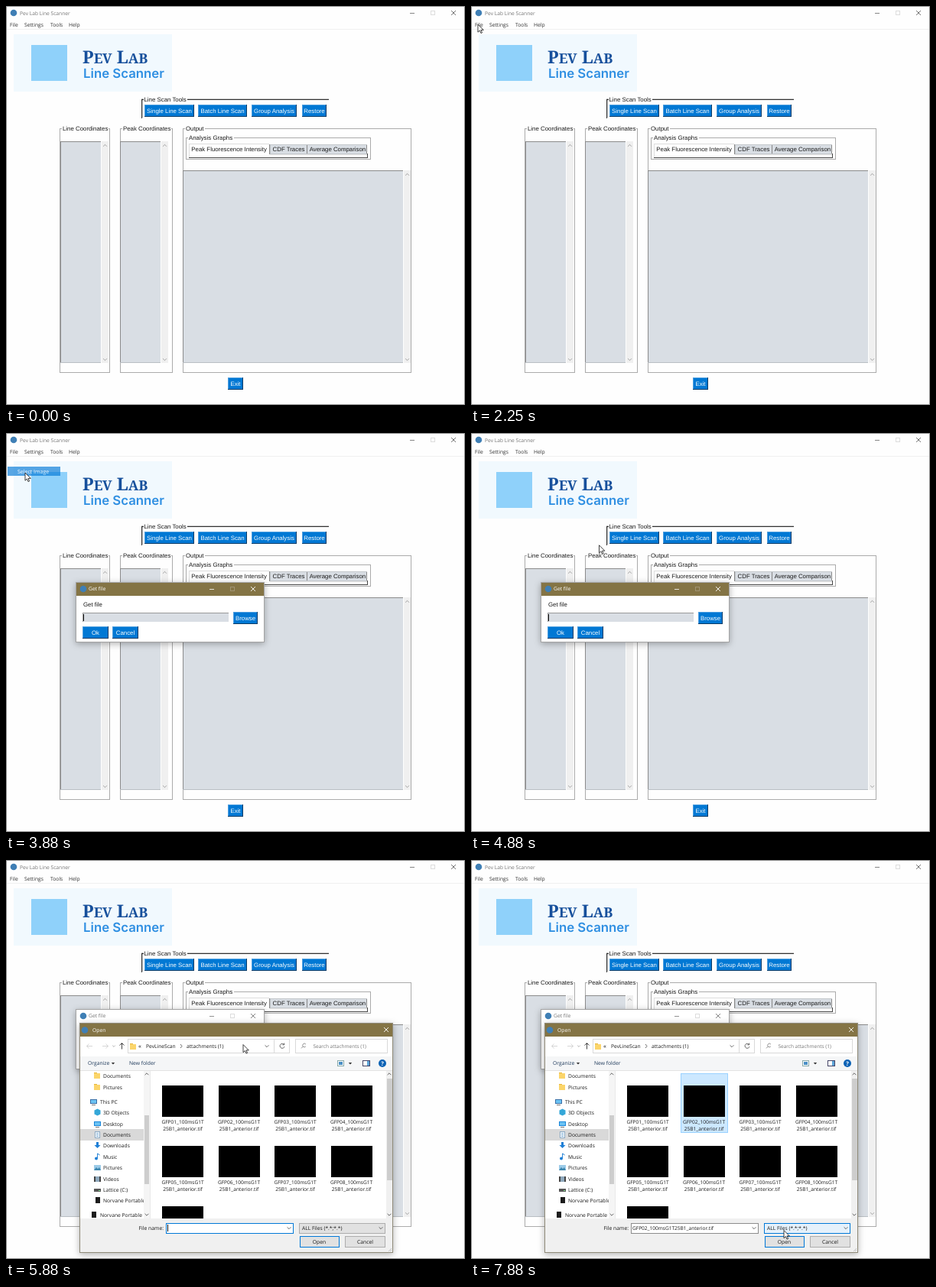
Animation, 600 px wide and 522 px high, one loop 8 s. Source, as an HTML page:

```html
<!DOCTYPE html>
<html lang="en">
<head>
<meta charset="utf-8">
<title>Pev Lab Line Scanner</title>
<style>
html, body { margin: 0; width: 100%; height: 100%; overflow: hidden; background: #fff; }
svg { display: block; width: 600px; height: 522px; }
text { text-rendering: geometricPrecision; white-space: pre; }
rect { shape-rendering: crispEdges; }
.ui { font-family: "Open Sans", "Noto Sans", sans-serif; }
.tk { font-family: "Liberation Sans", Arial, sans-serif; }
.logo { font-family: "Noto Serif", serif; font-weight: 600; }
.brand { font-family: Inter, sans-serif; font-weight: 600; }
</style>
</head>
<body>
<svg id="stage" viewBox="0 0 600 522" xmlns="http://www.w3.org/2000/svg"></svg>
<script>
const BLUE = '#0178d4', PANEL = '#d9dee4', BROWN = '#847445', SKY = '#8fd1fa';
const LOOP = 8000, STEP = 125;

// ---- drawing helpers, each returns SVG markup ----
const box = (x, y, w, h, fill, extra = '') =>
  `<rect x="${x}" y="${y}" width="${w}" height="${h}" fill="${fill}" ${extra}/>`;
const edge = (x, y, w, h, stroke, fill = 'none', extra = '') =>
  box(x + .5, y + .5, w - 1, h - 1, fill, `stroke="${stroke}" ${extra}`);
const line = (d, stroke = '#555', w = .8, extra = '') =>
  `<path d="${d}" fill="none" stroke="${stroke}" stroke-width="${w}" ${extra}/>`;
const shape = (d, fill) => `<path d="${d}" fill="${fill}"/>`;
const dot = (x, y, r, fill) => `<circle cx="${x}" cy="${y}" r="${r}" fill="${fill}"/>`;
const text = (cls, x, y, s, size, fill = '#1a1a1a', anchor = 'start', extra = '') =>
  `<text class="${cls}" x="${x}" y="${y}" font-size="${size}" fill="${fill}" text-anchor="${anchor}" ${extra}>${s}</text>`;
const ui = (x, y, s, size = 6.75, fill, anchor, extra) => text('ui', x, y, s, size, fill, anchor, extra);
const tk = (x, y, s, fill, anchor) => text('tk', x, y, s, 7.85, fill, anchor);
const group = (id, s, extra = '') => `<g id="${id}" ${extra}>${s}</g>`;

const chevron = (x, y, up, c = '#555', r = 2.4) => {
  const d = up ? -r / 2 : r / 2;
  return line(`M${x - r} ${y - d}L${x} ${y + d}L${x + r} ${y - d}`, c, .9);
};
const caretDown = (x, y) => shape(`M${x - 2.2} ${y - 1}h4.4l-2.2 2.6z`, '#333');
const cross = (x, y, c) => line(`M${x - 3} ${y - 3}l6 6m0 -6l-6 6`, c, .9);
const winButtons = (x, y, c, dim) =>
  line(`M${x} ${y + .5}h6`, c) + edge(x + 27, y - 3, 6, 6, dim) + cross(x + 57, y, c);

function button(x, y, w, label) {
  const h = 16;
  return box(x, y, w, h, '#0b3b66') + box(x, y, w - 1, h - 1, '#4f9fdf') +
    box(x + 1, y + 1, w - 2, h - 2, BLUE) +
    tk(x + w / 2, y + 10.7, label, '#fff', 'middle');
}
function frame(x, y, w, h, label, lw) {
  return edge(x, y, w, h, '#ababab') + box(x + 3, y - 3, lw + 2, 7, '#fefefe') +
    tk(x + 4, y + 3, label);
}
function listBox(x, y, w, h) {
  const s = x + w + 1, c = s + 4.5;
  return box(x, y, w, h, PANEL) + box(x, y, w, 1, '#8b8b8b') + box(x, y, 1, h, '#8b8b8b') +
    box(x, y + h - 1, w, 1, '#b9bec3') + box(s, y, 9, h, '#f0f0f0') +
    chevron(c, y + 5.5, true, '#999') + chevron(c, y + h - 4.5, false, '#999');
}

// ---- main window ----
function mainWindow() {
  let s = box(0, 0, 600, 522, '#fefefe') + box(0, 30, 600, 1, '#f0f0f0');
  s += dot(10, 9, 4.3, '#3f7fb5') + ui(18, 11.6, 'Pev Lab Line Scanner', 6.7, '#777');
  s += winButtons(528, 9, '#666', '#ddd');
  s += group('fileHot', box(1, 19, 19, 11, '#cce8ff'));
  [[5, 'File'], [24, 'Settings'], [58, 'Tools'], [82, 'Help']].forEach(([x, m]) => {
    s += ui(x, 26.8, m, 6.75, '#333');
  });

  s += box(10, 37, 207, 75, '#f1f9fe') + box(33, 51, 47, 47, SKY);
  const big = c => `<tspan font-size="23">${c}</tspan>`;
  s += text('logo', 100, 75, `${big('P')}EV${big(' L')}AB`, 18, '#17509c');
  s += text('brand', 101, 94, 'Line Scanner', 16.8, '#2f8fe2');

  s += box(177, 121, 245, 1, '#c4c4c4') + box(177, 122, 245, 1, '#333');
  s += box(177, 122, 1, 25, '#333') + box(178, 123, 1, 23, '#c4c4c4');
  s += box(180, 118, 57, 9, '#fefefe') + tk(180.5, 125, 'Line Scan Tools');
  [[181, 65, 'Single Line Scan'], [251, 64, 'Batch Line Scan'],
   [321, 59, 'Group Analysis'], [387, 32, 'Restore']].forEach(([x, w, l]) => {
    s += button(x, 129, w, l);
  });

  s += frame(70, 160, 66, 320, 'Line Coordinates', 59) + listBox(71, 177, 53, 290);
  s += frame(149, 160, 69, 320, 'Peak Coordinates', 62) + listBox(149, 177, 53, 290);
  s += frame(231, 160, 299, 320, 'Output', 24) + listBox(231, 215, 288, 252);

  s += frame(235, 172, 242, 29, 'Analysis Graphs', 58);
  s += edge(345, 181, 49, 13, '#c3c7cb', PANEL) + edge(393, 181, 79, 13, '#c3c7cb', PANEL);
  s += box(393, 182, 1, 11, '#888') + box(471, 182, 1, 11, '#888');
  s += box(239, 180, 105, 15, '#fff') + box(239, 180, 105, 1, '#ddd') + box(239, 180, 1, 18, '#ddd');
  s += box(344, 181, 1, 13, '#888') + box(345, 194, 127, 1, '#e4e4e4');
  s += box(239, 198, 234, 1, '#444') + box(472, 193, 1, 6, '#444');
  s += tk(242.3, 190, 'Peak Fluorescence Intensity') + tk(348.6, 190, 'CDF Traces') + tk(396.7, 190, 'Average Comparison');
  return s + button(290, 486, 20, 'Exit') + edge(0, 0, 600, 522, '#8a8a8a');
}

// ---- drop-down of the File menu ----
const fileMenu = () =>
  group('menuBox', edge(0, 30, 74, 29, '#ccc', '#f2f2f2')) +
  group('menuItem', box(2, 44, 69, 12, '#0078d7') + ui(15, 52.5, 'Select Image', 7, '#fff'));

// ---- small path dialog ----
function getFileDialog() {
  let s = box(91, 195, 247, 79, '#fff', 'filter="url(#shadow)"');
  s += group('getActive', box(91, 195, 247, 18, BROWN) + ui(108, 206.4, 'Get file', 6.75, '#fff') +
    winButtons(266, 204, '#fff', '#a09372'));
  s += group('getIdle', ui(108, 206.4, 'Get file', 6.75, '#777') + winButtons(266, 204, '#777', '#ddd'));
  s += dot(101, 204, 4.3, '#3f7fb5') + tk(101, 227.3, 'Get file');
  s += box(100, 235, 191, 12, PANEL) + box(100, 235, 191, 1, '#999') + box(100, 235, 1, 12, '#999');
  s += group('getCaret', box(101, 237, 1, 9, '#111'));
  s += button(297, 234, 32, 'Browse') + button(100, 253, 34, 'Ok') + button(139, 253, 34, 'Cancel');
  return s + edge(91, 195, 247, 79, '#a4a4a4');
}

// ---- file chooser ----
const folder = (x, y) => box(x, y - 4, 4, 2, '#e8b63a') + box(x, y - 3, 8, 7, '#fbd56b');
const screen = (x, y, c) => box(x, y - 3, 9, 6, c) + box(x + 1, y - 2, 7, 4, '#6cc3f3') + box(x + 2, y + 4, 5, 1, '#777');
const page = (x, y) => edge(x + 1, y - 4, 7, 9, '#8aa9c4', '#fff') + line(`M${x + 3} ${y - 1.5}h3m-3 2h3m-3 2h3`, '#4a90c8', .7);
const drive = (x, y, c = '#555') => box(x, y - 1, 9, 4, c) + box(x + 6, y + 1, 2, 1, '#7fe08a');
const ICONS = {
  folder, page, drive, pc: (x, y) => screen(x, y, '#3a6ea5'), desk: (x, y) => screen(x, y, '#1a86d9'),
  cube: (x, y) => shape(`M${x + 4.5} ${y - 4.5}l4 2v5l-4 2l-4 -2v-5z`, '#35a7d8'),
  down: (x, y) => shape(`M${x + 3} ${y - 4}h3v4h2.5l-4 4l-4 -4h2.5z`, '#1e7fd6'),
  note: (x, y) => dot(x + 3, y + 2.5, 2, '#1e7fd6') + line(`M${x + 4.6} ${y + 2}v-6l3 2`, '#1e7fd6', 1),
  photo: (x, y) => box(x, y - 3, 9, 7, '#9ccbe8') + shape(`M${x} ${y + 4}l3 -4l2 2l2 -2l2 4z`, '#3f88b0'),
  film: (x, y) => box(x, y - 3, 9, 7, '#444') + box(x + 2, y - 3, 5, 7, '#8fa9bd'),
  disk: (x, y) => box(x + 2, y - 4, 6, 8, '#1c1c1c')
};
const TREE = [
  [282, 'folder', 'Documents'], [297, 'folder', 'Pictures'], [316, 'pc', 'This PC', 1],
  [330, 'cube', '3D Objects'], [345, 'desk', 'Desktop'], [359, 'page', 'Documents'],
  [373, 'down', 'Downloads'], [388, 'note', 'Music'], [402, 'photo', 'Pictures'],
  [417, 'film', 'Videos'], [431, 'drive', 'Lattice (C:)'], [445, 'disk', 'Norvane Portable ('],
  [464, 'disk', 'Norvane Portable (D', 1]
];

function tree() {
  let s = box(97, 352, 83, 15, '#d9d9d9');
  TREE.forEach(([y, icon, label, top]) => {
    s += ICONS[icon](top ? 110 : 115, y) + ui(top ? 123 : 127, y + 2.7, label, 6.7);
  });
  return `<g clip-path="url(#treeClip)">${s}</g>` +
    box(180, 276, 8, 193, '#f5f5f5') + chevron(184, 280, true) + box(181, 334, 6, 90, '#cdcdcd') +
    chevron(184, 464) + box(188, 276, 1, 193, '#e8e8e8');
}

function files() {
  let s = group('pick', '<rect x="274.5" y="279.5" width="61" height="77"/>');
  for (let i = 0; i < 9; i++) {
    const x = 204 + i % 4 * 73.5, y = [295, 374, 453][i >> 2];
    s += box(x, y, 54, i < 8 ? 41 : 16, '#000');
    if (i < 8) {
      s += ui(x + 27, y + 50.2, `GFP0${i + 1}_100msG1T`, 6.55, '#1a1a1a', 'middle');
      s += ui(x + 27, y + 59.2, '25B1_anterior.tif', 6.65, '#1a1a1a', 'middle');
    }
  }
  return s + box(497, 276, 8, 193, '#f0f0f0') + chevron(501, 280, true) +
    box(498, 286, 7, 133, '#cdcdcd') + chevron(501, 464);
}

function openDialog() {
  let s = box(96, 213, 410, 301, '#fff', 'filter="url(#shadow)"');
  s += group('openTitle', box(96, 213, 410, 18, BROWN));
  s += dot(103, 222.5, 4.3, '#3f7fb5') + ui(113, 224.8, 'Open', 6.75, '#fff') + cross(497, 222, '#fff');

  s += line('M113 243.500h-7.500m3 -3l-3 3l3 3', '#ccc') + line('M126 243.500h7.500m-3 -3l3 3l-3 3', '#ccc');
  s += chevron(141, 243.5, false, '#aaa', 1.8) + line('M151.500 247.500v-8m-3 3l3 -3l3 3', '#444', 1);
  s += edge(159, 234, 192, 19, '#d9d9d9') + folder(162, 243.5);
  s += ui(173, 246, '«', 7.5) + ui(183, 246, 'PevLineScan', 6.7) +
    line('M228 241l2 2.500l-2 2.500', '#444') + ui(236, 246, 'attachments (1)', 6.7);
  s += chevron(341, 243.5) + edge(350, 234, 21, 19, '#d9d9d9');
  s += line('M363.500 241.500a3 3 0 1 0 .500 2.500m-.300 -4.500v2.300h-2.300', '#444');
  s += edge(378, 234, 121, 19, '#d9d9d9') + line('M392 241.200a2.300 2.300 0 1 0 -.100 2.600m-3.600 .200l-2.300 2.300', '#777');
  s += ui(401.5, 246, 'Search attachments (1)', 6.5, '#777');

  s += box(97, 257, 408, 18, '#f5f6f7') + box(97, 275, 408, 1, '#e3e3e3');
  s += ui(107, 268.4, 'Organize', 6.75, '#1e395b') + caretDown(140, 266) + ui(161, 268.4, 'New folder', 6.75, '#1e395b');
  s += edge(433, 262, 9, 8, '#8aa', '#fff') + box(435, 264, 5, 4, '#4a8fc5') + caretDown(450, 266);
  s += edge(466, 262, 10, 8, '#446', '#fff') + box(472, 263, 3, 6, '#5ca4d8');
  s += dot(492, 266, 5, '#0b62b5') + ui(492, 268.7, '?', 7.5, '#fff', 'middle', 'font-weight="700"');
  s += tree() + files();

  s += box(97, 469, 408, 44, '#f0f0f0') + ui(206, 484, 'File name:', 6.8, '#1a1a1a', 'end');
  s += edge(209, 475, 167, 14, '#8c8c8c', '#fff') + group('nameFocus', edge(209, 475, 167, 14, '#0078d7'));
  s += group('nameCaret', box(211, 477, 1, 9, '#111')) + chevron(370, 481.5);
  s += group('nameText', ui(211, 484, 'GFP02_100msG1T25B1_anterior.tif', 6.55));
  s += group('filter', '<rect x="383.5" y="475.5" width="112" height="13"/>');
  s += ui(387, 484, 'ALL Files (*.*;*.*)', 6.7) + chevron(490, 481.5);
  s += box(384, 492, 52, 15, '#0078d7') + box(385, 493, 50, 13, '#e1e1e1') + ui(409.5, 501.8, 'Open', 6.75, '#1a1a1a', 'middle');
  s += edge(443, 492, 53, 15, '#adadad', '#e1e1e1') + ui(469.5, 501.8, 'Cancel', 6.75, '#1a1a1a', 'middle');
  s += line('M500 512l4 -4m-2 4l2 -2', '#bbb');
  return s + edge(96, 213, 410, 301, '#8f8a78');
}

const stage = document.getElementById('stage');
stage.innerHTML =
  `<defs><filter id="shadow" x="-10%" y="-10%" width="120%" height="125%">
    <feDropShadow dx="0" dy="2" stdDeviation="4" flood-color="#000" flood-opacity=".3"/></filter>
    <clipPath id="treeClip"><rect x="97" y="276" width="83" height="193"/></clipPath></defs>` +
  mainWindow() + fileMenu() + group('getFile', getFileDialog()) + group('open', openDialog()) +
  group('pointer', '<path d="M0 0V10.2L2.400 8L4 11.600L5.600 10.900L4 7.400H7.300Z" fill="#fff" stroke="#111" stroke-width=".8"/>');

// ---- motion ----
const el = {};
stage.querySelectorAll('g[id]').forEach(g => el[g.id] = g);

// pointer stops: time, x, y
const PATH = [
  [125, 454, 489], [625, 82, 361], [875, 82, 361], [1750, 19, 64], [2125, 9, 24], [2625, 9, 24],
  [3250, 25, 52], [4375, 25, 52], [5375, 310, 241.5], [6125, 310, 241.5], [6625, 304, 317.5],
  [7000, 304, 317.5], [7875, 409, 484.5]
];
const clamp = v => Math.max(0, Math.min(1, v));
const smooth = v => v * v * (3 - 2 * v);

function pointerAt(t) {
  const i = PATH.findIndex(p => p[0] > t);
  if (i < 0) return PATH[PATH.length - 1].slice(1);
  if (i === 0) return PATH[0].slice(1);
  const [t0, x0, y0] = PATH[i - 1], [t1, x1, y1] = PATH[i];
  const k = smooth((t - t0) / (t1 - t0));
  return [x0 + (x1 - x0) * k, y0 + (y1 - y0) * k];
}
const show = (id, on) => el[id].setAttribute('display', on ? 'inline' : 'none');
const fade = (id, v) => { show(id, v > 0); el[id].setAttribute('opacity', v); };
const paint = (id, fill, stroke) => {
  el[id].setAttribute('fill', fill);
  el[id].setAttribute('stroke', stroke);
};
function popIn(id, p, cx, cy) {
  const s = .95 + .05 * p;
  fade(id, p);
  el[id].setAttribute('transform', `translate(${cx} ${cy}) scale(${s}) translate(${-cx} ${-cy})`);
}

function render(now) {
  const t = Math.floor((now % LOOP) / STEP) * STEP;
  const [x, y] = pointerAt(t);
  show('pointer', t >= 125);
  el.pointer.setAttribute('transform', `translate(${x} ${y})`);

  const menu = t >= 2500 && t < 3750;
  show('fileHot', menu);
  show('menuBox', menu);
  // the item is plain until the pointer reaches it, then fades after the click
  fade('menuItem', t < 3125 || t >= 4000 ? 0 : 1 - .35 * clamp((t - 3625) / 250));

  const active = t < 5625;
  popIn('getFile', clamp((t - 3650) / 200), 214, 234);
  show('getActive', active);
  show('getIdle', !active);
  show('getCaret', active && (t - 3875) % 900 < 600);

  const p = clamp((t - 5605) / 150), picked = t >= 6875;
  popIn('open', p, 295, 364);
  fade('openTitle', clamp((p - .3) / .5));
  show('pick', t >= 6500);
  paint('pick', picked ? '#cce8ff' : '#e5f3ff', picked ? '#99d1ff' : '#e5f3ff');
  show('nameText', picked);
  show('nameCaret', !picked && (t - 5875) % 1060 < 530);
  fade('nameFocus', 1 - clamp((t - 7000) / 250));
  const onFilter = y > 475 && y < 489 && x > 383 && x < 496;
  paint('filter', onFilter ? '#e5f1fb' : '#e1e1e1', onFilter ? '#0078d7' : '#adadad');
}

const start = performance.now();
function tick() {
  render(performance.now() - start);
  requestAnimationFrame(tick);
}
render(0);
requestAnimationFrame(tick);
</script>
</body>
</html>
```
